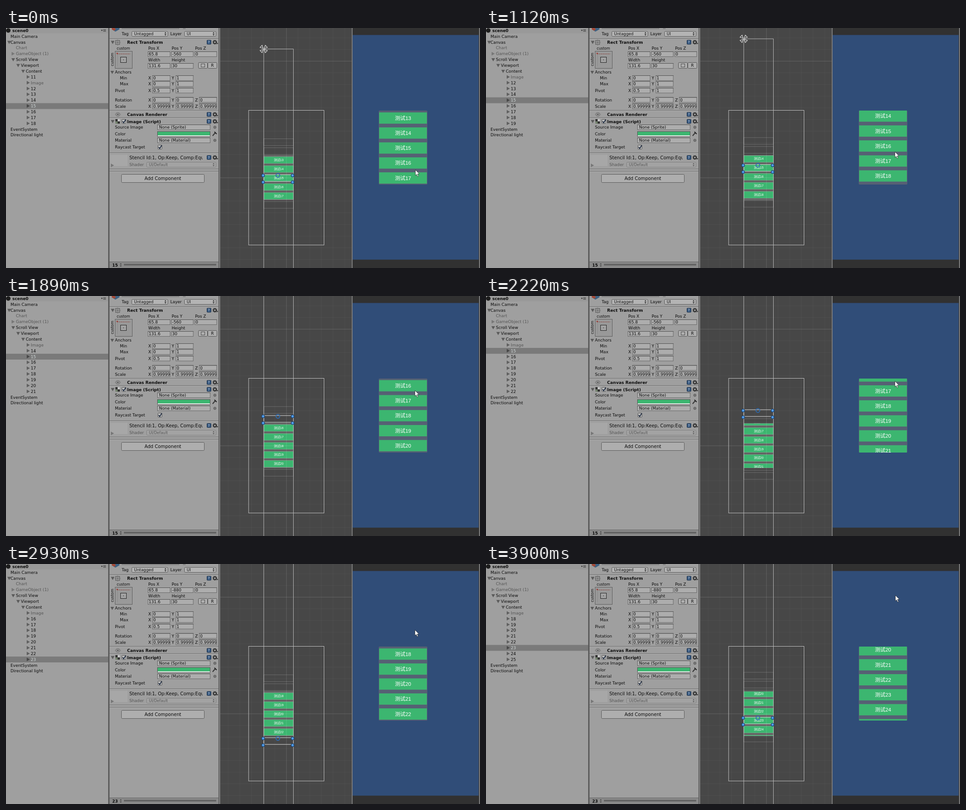
An HTML page that plays this animation: 1053 px wide and 532 px high, repeating every 3.97 s.

```html
<!DOCTYPE html>
<html lang="en">
<head>
<meta charset="utf-8">
<title>Recycled scroll list</title>
<style>
html, body { margin: 0; width: 100%; height: 100%; overflow: hidden; background: #474747; }
svg { display: block; width: 100%; height: 100%; }
text { font: 9.1px "DejaVu Sans", sans-serif; fill: #0c0c0c; white-space: pre; }
.b { font-weight: bold; }
.label { font-family: "Liberation Sans", "Noto Sans CJK SC", "Noto Sans CJK", sans-serif; fill: #fff; text-anchor: middle; }
</style>
</head>
<body>
<svg id="stage" viewBox="0 0 1053 532" xmlns="http://www.w3.org/2000/svg"></svg>
<script>
const LOOP = 3970;
const GREEN = '#3cb670';
const STEPS = [[0, 0], [50, .5], [479, .9], [480, 1], [790, 6], [1000, 9], [1070, 10], [1450, 16], [1640, 19],
  [1890, 23], [2220, 28], [2600, 34], [2810, 37], [3260, 44], [3380, 46], [3900, 54], [3970, 54.9]];
const SCROLL = [[0, 0], [1, 1], [6, 15.3], [9, 32.5], [16, 68.3], [23, 100.3], [34, 147.9], [44, 192.9], [54, 241.8]];
const MOUSE_Y = [[0, 314], [1, 312], [6, 296], [9, 279], [16, 244], [23, 209], [34, 163.5], [44, 119], [54, 69]];
const MOUSE_X = [[0, 909], [1, 908], [23, 908], [34, 907], [44, 909], [54, 909]];

function lerp(keys, x) {
  let i = 1;
  while (i < keys.length - 1 && x >= keys[i][0]) i++;
  const [x0, y0] = keys[i - 1], [x1, y1] = keys[i];
  return y0 + (y1 - y0) * Math.min(1, (x - x0) / (x1 - x0));
}

const rect = (x, y, w, h, fill, more = '') => `<rect x="${x}" y="${y}" width="${w}" height="${h}" fill="${fill}" ${more}/>`;
const frame = (x, y, w, h, stroke, more = '') => rect(x, y, w, h, 'none', `stroke="${stroke}" ${more}`);
const path = (d, fill, more = '') => `<path d="${d}" fill="${fill}" ${more}/>`;
const line = (d, stroke, more = '') => path(d, 'none', `stroke="${stroke}" ${more}`);
const circle = (x, y, r, fill, more = '') => `<circle cx="${x}" cy="${y}" r="${r}" fill="${fill}" ${more}/>`;
// y is the vertical middle of the text
const text = (x, y, s, { size = 9.1, fill = '#0c0c0c', more = '' } = {}) =>
  `<text x="${x}" y="${y + size * .36}" style="font-size:${size}px;fill:${fill}" ${more}>${s}</text>`;
const bold = (x, y, s, size = 9.3) => text(x, y, s, { size, more: 'class="b"' });
const fold = (x, y, open, fill = '#5a5a5a') =>
  path(open ? `M${x - 4} ${y - 3}h8l-4 7z` : `M${x - 3} ${y - 4}l7 4l-7 4z`, fill);
const label = (x, y, size, k) => `<text class="label" x="${x}" y="${y + size * .36}" style="font:${size}px 'Liberation Sans','Noto Sans CJK SC','Noto Sans CJK',sans-serif;fill:#fff">测试${k}</text>`;

function field(x, y, w, s = '') {
  return rect(x + .5, y + .5, w - 1, 11, '#adadad', 'stroke="#686868"') +
    line(`M${x} ${y + .5}h${w}`, '#4e4e4e') +
    `<svg x="${x}" y="${y}" width="${w - 1}" height="12">${text(2, 6.2, s)}</svg>`;
}

function popup(x, y, w, s, dim) {
  const ink = dim ? '#555' : '#111';
  return rect(x + .5, y + .5, w - 1, 11, dim ? '#a3a3a3' : '#b4b4b4', `rx="2" stroke="${dim ? '#808080' : '#5c5c5c'}"`) +
    text(x + 5.5, y + 6, s, { size: dim ? 8.4 : 8.8, fill: ink }) +
    path(`M${x + w - 8} ${y + 5}l2.2 -2.6l2.2 2.6zm0 2l2.2 2.6l2.2 -2.6z`, ink);
}

function check(x, y) {
  return rect(x + .5, y + .5, 9, 9, '#b8b8b8', 'rx="1" stroke="#555"') +
    line(`M${x + 2} ${y + 5}l2.5 3l4.5 -7`, '#15233a', 'stroke-width="1.8"');
}

function tools(y) {
  return rect(446.5, y - 4.5, 9, 9, '#35577f', 'rx="1" stroke="#1f3148"') +
    text(448.6, y, '?', { size: 7.5, fill: '#e8eef5' }) +
    circle(464, y, 3, 'none', 'stroke="#303030" stroke-width="2"') +
    circle(464, y, 4.4, 'none', 'stroke="#303030" stroke-width="1.4" stroke-dasharray="1.7 1.75"') +
    path(`M467.5 ${y + 2}h4l-2 2.5z`, '#222');
}

const rule = y => line(`M230 ${y}h242`, '#6a6a6a') + line(`M230 ${y + 1}h242`, '#b0b0b0');

function hierarchy() {
  const dim = { fill: '#555' };
  return rect(0, 0, 227, 532, '#9f9f9f') + rect(0, 0, 227, 12, '#999') +
    circle(5, 5.5, 5, '#1c1c1c') + bold(14, 5.5, 'scene0', 9.1) +
    path('M211 4h4l-2 3z', '#333') + line('M216 3.5h6m-6 2h6m-6 2h6', '#444') +
    text(10, 18.5, 'Main Camera') +
    fold(7, 31.4, true) + text(10, 31.4, 'Canvas') +
    text(22, 44.2, 'Chart', dim) +
    fold(15.5, 57, false, '#777') + text(22, 57, 'GameObject (1)', dim) +
    fold(16, 70, true) + text(22, 70, 'Scroll View') +
    fold(27, 82.8, true) + text(33, 82.8, 'Viewport') +
    fold(38, 95.7, true) + text(44, 95.7, 'Content') +
    text(10, 224.3, 'EventSystem') + text(10, 237.2, 'Directional light');
}

function vector(y, names, values) {
  return names.map((n, i) => text(316 + i * 52, y, n) + field(325 + i * 52, y - 6, i ? 39.5 : 40, values[i])).join('');
}

function inspector() {
  const small = { size: 8 };
  return rect(230, 0, 242, 532, '#9f9f9f') +
    // object header
    path('M235 0h17v3l-9 5l-8 -5z', '#3d6384') + path('M235 0h7l2 4l-4 2l-5 -3z', '#a34a38') +
    line('M257 1.5h128m8 0h6', '#666') +
    text(257, 13, 'Tag') + popup(279, 7, 81, 'Untagged') +
    text(365, 13, 'Layer') + popup(396, 7, 71, 'UI') + rule(23.5) +
    // rect transform
    fold(237, 31.5, true) + frame(243.5, 27.5, 9, 9, '#555') +
    line('M248 25v14M241 32h14M245 29l6 6m0 -6l-6 6', '#6c6c6c', 'stroke-width=".8"') +
    bold(269, 32, 'Rect Transform') + tools(31.5) +
    text(246, 45, 'custom', small) +
    text(0, 0, 'custom', { size: 8, more: 'transform="translate(236.5 84.5) rotate(-90)"' }) +
    rect(242.5, 51.5, 38, 38, '#999', 'stroke="#5e5e5e"') +
    line('M247 57.5h29', '#8e4740', 'stroke-dasharray="3 1"') + line('M247.5 57v28', '#8b8b8b') +
    path('M245 55h4l-2 4z', '#9c3b34') +
    rect(254.5, 64.5, 13, 12, '#a2a2a2', 'stroke="#222"') + circle(261, 70.5, .9, '#444') +
    ['Pos X', 'Pos Y', 'Pos Z'].map((s, i) => text(316 + i * 52, 45, s)).join('') +
    field(315, 52, 50, '65.8') + field(419, 52, 49.5, '0') +
    text(316, 71, 'Width') + text(368, 71, 'Height') + field(315, 78, 50, '131.6') + field(367, 78, 49.5, '30') +
    rect(427.5, 76.5, 20, 13, '#adadad', 'rx="2" stroke="#555"') +
    rect(448.5, 76.5, 20, 13, '#adadad', 'rx="2" stroke="#555"') +
    frame(433.5, 79.5, 8, 7, '#222', 'stroke-dasharray="2 1"') + text(455.5, 83.2, 'R', { size: 8.8 }) +
    fold(236, 98, true) + text(242, 98, 'Anchors') +
    text(253, 111, 'Min') + vector(111, ['X', 'Y'], [0, 1]) +
    text(253, 124, 'Max') + vector(124, ['X', 'Y'], [0, 1]) +
    text(242, 138.5, 'Pivot') + vector(138.5, ['X', 'Y'], [0.5, 1]) +
    text(242, 159.3, 'Rotation') + vector(159.3, ['X', 'Y', 'Z'], [0, 0, 0]) +
    text(242, 173.5, 'Scale') + vector(173.5, ['X', 'Y', 'Z'], Array(3).fill('0.999999')) + rule(182.5) +
    // canvas renderer
    circle(248.5, 191.5, 4, 'none', 'stroke="#666"') + circle(248.5, 191.5, 1.7, '#555') +
    line('M242 191.5q6.5 -8 13 0q-6.5 8 -13 0', '#777', 'stroke-width=".8"') +
    bold(269, 192, 'Canvas Renderer') + tools(191.5) + rule(198.5) +
    // image
    fold(237, 207, true) + rect(243, 202, 5, 5, '#333') + rect(248, 207, 5, 5, '#333') +
    rect(248, 202, 5, 5, '#c5c5c5') + rect(243, 207, 5, 5, '#71806b') +
    check(257, 202) + bold(269, 207.3, 'Image (Script)') + tools(207) +
    [[220, 'Source Image', 'None (Sprite)'], [249, 'Material', 'None (Material)']].map(([y, a, b]) =>
      text(242, y, a) + field(336, y - 6, 118, '') + text(340, y + .2, b, { size: 9 }) +
      circle(464, y, 2.7, 'none', 'stroke="#444"') + circle(464, y, 1, '#333')).join('') +
    text(242, 234.7, 'Color') + rect(336.5, 229.5, 117, 11, '#eee', 'stroke="#555"') + rect(337, 230, 116, 8, GREEN) +
    line('M459 239l6 -7', '#333', 'stroke-width="2"') + line('M463 230l5 5', '#222', 'stroke-width="2"') +
    text(242, 264, 'Raycast Target') + check(337, 259) + rule(276.5) +
    // material
    rect(232, 281, 38, 25, '#a7a7a7') + `<svg x="274" y="278" width="163" height="18">${text(0, 9.2, 'Stencil Id:1, Op:Keep, Comp:Equal', { size: 10.2 })}</svg>` +
    tools(287) + fold(236, 304.5, false, '#777') +
    text(274, 303, 'Shader', { fill: '#555' }) + popup(312, 297, 155, 'UI/Default', true) +
    rule(312.5) + rule(317.5) +
    rect(256.5, 324.5, 184, 18, '#aeaeae', 'rx="2" stroke="#5a5a5a"') +
    text(348.5, 333.3, 'Add Component', { size: 10.15, more: 'text-anchor="middle"' }) +
    // footer
    rect(230, 518, 242, 14, '#8a8a8a') + line('M230 518.5h242', '#5e5e5e') +
    rect(262, 523, 205, 4, '#6c6c6c') + line('M262 523.5h205', '#4c4c4c') +
    path('M253 524l2 -2.5l2 2.5zm0 2.5l2 2.5l2 -2.5z', '#333');
}

function grid() {
  let minor = '';
  for (let i = -5; i < 6; i++) if (i) minor += `M${623 + i * 25.85} 0V532`;
  for (let i = -12; i < 8; i++) if (i && i !== -10) minor += `M476 ${332 + i * 25.85}H768`;
  return line(minor, '#fff', 'opacity=".045"') + line('M623 0V532M476 332H768M476 73.5H768', '#fff', 'opacity=".15"');
}

function outline(k, s) {
  return frame(572.7, 46.5 + (k - 1) * 19.9 - s, 65.7, 14.9, '#fff', 'opacity=".2"');
}

function selection(k, s) {
  const y = 46.5 + (k - 1) * 19.9 - s, bot = y + 14.9;
  const dot = (x, cy) => circle(x, cy + 1.8, 3.5, '#3b87d8', 'stroke="#17375c"') + circle(x, cy + 1.3, 1.4, '#6fb0ee');
  return frame(572.7, y, 65.7, 14.9, '#d0d0d0') +
    dot(571.2, y) + dot(636.7, y) + dot(571.2, bot) + dot(636.7, bot) +
    circle(604, y + 1.8, 4.2, 'none', 'stroke="#2c6cb4" stroke-width="1.8"');
}

function anchor(y) {
  const wing = 'M0 -1.5l-3.3 -6.8h6.6z';
  return `<g transform="translate(572.5 ${y}) rotate(45)">` + [0, 90, 180, 270].map(a =>
    path(wing, '#474747', `stroke="#e6e6e6" stroke-width="1.1" transform="rotate(${a})"`)).join('') + '</g>';
}

function rows(first, sel) {
  const names = Array.from({ length: 8 }, (_, i) => first + i);
  names.splice(first === 11 ? 1 : 0, 0, 'Image');
  return names.map((n, i) => {
    const y = 108.5 + i * 12.87, on = n === sel;
    const fill = on ? '#d0d8d8' : n === 'Image' ? '#555' : '#0c0c0c';
    return (on ? rect(0, y - 6.3, 227, 13, '#7a7a7a') : '') +
      fold(49, y, false, on ? '#484848' : '#606060') + text(55, y, n, { fill });
  }).join('');
}

function draw(step) {
  const scroll = lerp(SCROLL, step), s = scroll * .5987;
  const first = 11 + Math.floor((scroll + 20.7) / 33.2);
  const sel = first > 15 ? 23 : 15;
  const items = Array.from({ length: 8 }, (_, i) => first + i);
  const top = 46.5 - s;

  tree.innerHTML = rows(first, sel);
  props.innerHTML = field(367, 52, 49.5, -40 * (sel - 1)) + bold(236, 525.3, sel, 9);
  sceneList.innerHTML = items.map(k => {
    const y = top + (k - 1) * 19.9;
    return rect(572.7, y, 65.7, 14.9, GREEN) + label(605.8, y + 7.3, 6.97, k);
  }).join('');
  gizmos.innerHTML = line(`M572.7 532V${top}H638.5V532`, '#b9b9b9') +
    items.map(k => outline(k, s)).join('') + selection(sel, s) + anchor(top);
  gameList.innerHTML = items.map(k => {
    const y = 187.1 + (k - 13) * 33.2 - scroll;
    return rect(829, y, 106, 25, GREEN) + label(882, y + 12.5, 11.63, k);
  }).join('');
  mouse.setAttribute('transform', `translate(${Math.round(lerp(MOUSE_X, step))} ${lerp(MOUSE_Y, step)})`);
}

const group = (id, more = '') => `<g id="${id}" ${more}></g>`;
document.getElementById('stage').innerHTML =
  '<clipPath id="sceneClip"><rect x="572" y="282.6" width="67" height="98.4"/></clipPath>' +
  '<clipPath id="gameClip"><rect x="828" y="183" width="108" height="164" rx="2"/></clipPath>' +
  '<clipPath id="sceneArea"><rect x="476" y="0" width="292" height="532"/></clipPath>' +
  rect(0, 0, 1053, 532, '#5a5a5a') + hierarchy() + group('tree') + inspector() + group('props') +
  rect(472, 0, 4, 532, '#7b7b7b') + line('M472.5 0V532', '#555') +
  '<g clip-path="url(#sceneArea)">' + rect(476, 0, 292, 532, '#474747') +
  rect(572.5, 282.6, 66, 98.4, '#636363') + group('sceneList', 'clip-path="url(#sceneClip)"') + grid() +
  frame(539, 182.5, 167.5, 298.5, '#c4c4c4') + frame(572.7, 282.6, 65.7, 98.4, '#fff', 'opacity=".2"') +
  group('gizmos') + '</g>' +
  rect(768, 0, 2, 532, '#7b7b7b') + rect(770, 0, 280, 532, '#313131') + rect(770, 15.5, 280, 498, '#304d78') +
  rect(1050, 0, 1, 532, '#3a3a3a') + rect(1051, 0, 2, 532, '#7b7b7b') +
  rect(828, 183, 108, 164, '#566074', 'rx="2"') + group('gameList', 'clip-path="url(#gameClip)"') +
  '<g id="mouse">' + path('M.5 .5V13l2.8 -2.7l2.2 5l2 -.9l-2.2 -4.8h4z', '#fff', 'stroke="#222" stroke-width=".7"') + '</g>';

const [tree, props, sceneList, gizmos, gameList, mouse] =
  ['tree', 'props', 'sceneList', 'gizmos', 'gameList', 'mouse'].map(id => document.getElementById(id));

const start = performance.now();
let shown = -1;
function tick() {
  const t = (performance.now() - start) % LOOP;
  const pos = lerp(STEPS, t);
  // the pointer nudges once before the drag begins
  const step = pos < 1 ? (t >= 50 ? .5 : 0) : Math.floor(pos + 1e-6);
  if (step !== shown) draw(step === .5 ? .5 : step);
  shown = step;
  requestAnimationFrame(tick);
}
tick();
</script>
</body>
</html>
```
